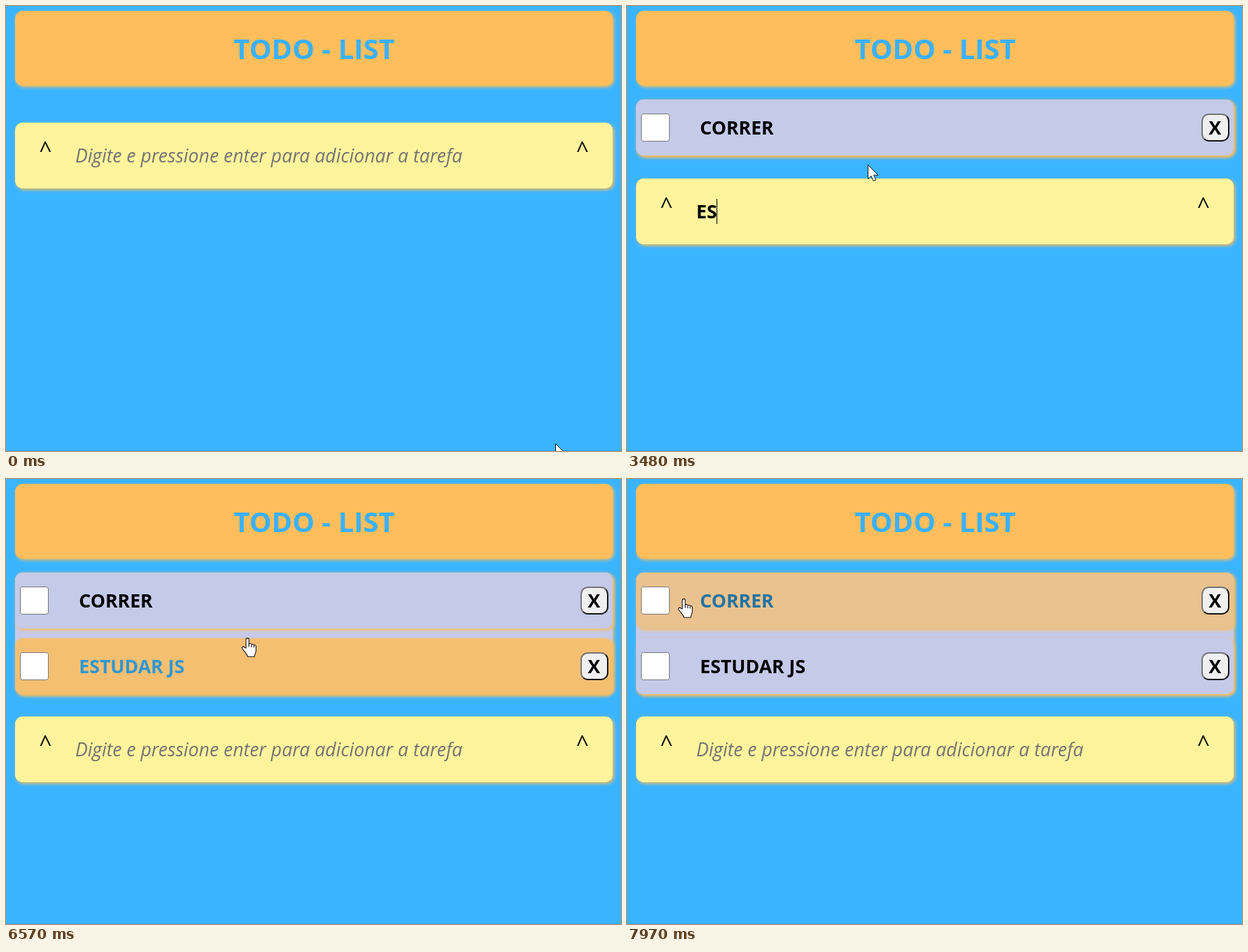
An HTML page for the animation above (8000 ms loop, 879x637 px).

```html
<!DOCTYPE html>
<html lang="pt">
<head>
<meta charset="utf-8">
<title>Todo list</title>
<style>
  html, body { margin: 0; width: 100%; height: 100%; overflow: hidden; background: #3ab4ff; }
  #stage {
    position: absolute; left: 0; top: 0; width: 879px; height: 637px; overflow: hidden;
    font: 26.67px "Open Sans", "Noto Sans", sans-serif; color: #000; white-space: pre;
  }
  #stage * { position: absolute; box-sizing: border-box; }
  .box { left: 13px; width: 854px; border-radius: 10.67px; box-shadow: 2px 2px 5.33px #ffbd59; }
  #title {
    top: 7px; height: 107px; line-height: 107px; background: #ffbe5b; color: #3ab1ff;
    font-size: 40px; font-weight: 700; text-align: center; text-indent: 1px;
  }
  #list { top: 134px; background: #c5cae9; }
  .item { left: 0; height: 80px; line-height: 80px; font-weight: 700; }
  .item b { left: 91.3px; }
  .check {
    left: 7px; top: 20px; width: 41px; height: 40px; background: #fff;
    border: 1.33px solid #767676; border-radius: 3.5px;
  }
  .close {
    left: 807.5px; top: 20px; width: 40px; height: 40px; line-height: 36px; text-align: center;
    background: #efefef; color: #000; border: 2.67px solid; border-radius: 10.67px;
    border-color: #767676 #151515 #151515 #767676;
  }
  #entry { height: 93.5px; line-height: 93.5px; background: #fff49c; }
  .mark { top: 15.5px; width: 40px; line-height: 45px; font-size: 32px; text-align: center; color: #111; }
  #line { left: 86px; top: 0; }
  #stage #line span { position: static; }
  #typed { font-weight: 700; }
  #hint { font-style: italic; color: #757575; }
  #caret { top: 28.5px; width: 1px; height: 36px; margin-left: -.45px; background: #000; }
  #edge { left: 0; top: 636px; width: 879px; height: 1px; background: #3a9fe2; }
  svg { left: 0; top: 0; }
</style>
</head>
<body>
<div id="stage">
  <div id="title" class="box">TODO - LIST</div>
  <div id="list" class="box"></div>
  <div id="entry" class="box">
    <div class="mark" style="left:23.3px">^</div>
    <div class="mark" style="left:791px">^</div>
    <div id="line"><span id="typed"></span><i id="caret"></i><span id="hint">Digite e pressione enter para adicionar a tarefa</span></div>
  </div>
  <div id="edge"></div>
  <svg width="879" height="637" stroke-linejoin="round">
    <g id="pointer">
      <path id="arrow" fill="#fff" stroke="#111" d="M.5.5V20.5L5 16.4 8.3 23.5 11.7 22 8.6 15.2H15z"/>
      <path id="beam" fill="none" stroke="#1a1a1a" stroke-width="1.6"
        d="M-3.5-10h4.5l1.5 1 1.5-1h4.5M2.5-9V11M-3.5 12h4.5l1.5-1 1.5 1h4.5"/>
      <g id="hand" fill="#fff" stroke="#111" stroke-width="1.1" transform="translate(-8 0)">
        <path d="M7 15V2.7a2.1 2.1 0 0 1 4.2 0V9.5a2 2 0 0 1 3.7.6 2 2 0 0 1 3.4 1 1.9 1.9 0 0 1 3 1.5V19c0 3-2.2 4.5-2.2 8.3H9.5C9 24 4.5 20 2 16.3c-1.7-2.4.8-4 2.7-2.5z"/>
        <path fill="none" d="M11.2 9.5v4M14.9 10.5v3.5M18.3 11.5v3"/>
      </g>
    </g>
  </svg>
</div>
<script>
const LOOP = 8000, FADE = 400, BLINK = 530;
const $ = id => document.getElementById(id);

const tasks = [
  { text: 'CORRER', keys: [1470, 1730, 2000, 2220, 2350, 2550], enter: 2950, hover: [[7265, 7550], [7825, 9000]] },
  { text: 'ESTUDAR JS', keys: [3280, 3480, 3680, 4010, 4270, 4400, 4680, 4950, 5550, 5880], enter: 6290, hover: [[6360, 7060]] }
];
const focusTime = 610;
const resets = [focusTime, ...tasks.flatMap(task => task.keys)];

// time, x, y of the pointer tip
const path = [
  [0, 785, 626], [70, 740, 590], [140, 612, 482], [210, 510, 405], [280, 436, 346],
  [350, 402, 315], [420, 370, 277], [490, 358, 252], [560, 348, 234], [630, 344, 227],
  [6570, 344, 227], [6780, 351, 278], [6850, 344, 274], [6990, 270, 235], [7060, 215, 222],
  [7130, 160, 217], [7200, 115, 215], [7270, 85, 198], [7340, 65, 188], [7410, 58, 184],
  [7550, 6, 190], [7620, 1, 190], [7760, 4, 188], [7830, 30, 180], [7900, 58, 174], [7970, 80, 171]
];
const shapes = [
  [0, 'arrow'], [490, 'beam'], [3080, 'arrow'], [6360, 'hand'], [7060, 'arrow'],
  [7270, 'hand'], [7340, 'arrow'], [7970, 'hand']
];

tasks.forEach((task, i) => {
  const el = document.createElement('div');
  el.className = 'box item';
  el.style.top = i * 93.5 + 'px';
  el.innerHTML = `<i class="check"></i><b>${task.text}</b><div class="close">X</div>`;
  $('list').append(el);
  task.el = el;
});

const lastBefore = (list, t) => list.filter(row => row[0] <= t).pop();
const mix = (a, b, k) => `rgb(${a.map((v, i) => v + (b[i] - v) * k).join(',')})`;

// the CSS "ease" curve: cubic-bezier(.25, .1, .25, 1)
function ease(x) {
  if (x <= 0) return 0;
  if (x >= 1) return 1;
  const bez = (a, b, s) => 3 * a * s * (1 - s) ** 2 + 3 * b * s * s * (1 - s) + s ** 3;
  let lo = 0, hi = 1;
  for (let i = 0; i < 20; i++) {
    const mid = (lo + hi) / 2;
    if (bez(.25, .25, mid) < x) lo = mid; else hi = mid;
  }
  return bez(.1, 1, lo);
}

function hoverLevel(spans, t) {
  return Math.max(...spans.map(([from, to]) =>
    ease((Math.min(t, to) - from) / FADE) * (1 - ease((t - to) / FADE))));
}

function drawPointer(t) {
  // the pointer is sampled every 70 ms
  const shift = t > 6000 ? 10 : 0;
  const s = Math.max(0, Math.floor((t + shift) / 70) * 70 - shift);
  const a = lastBefore(path, s);
  const b = path[path.indexOf(a) + 1] || a;
  const k = b === a ? 0 : (s - a[0]) / (b[0] - a[0]);
  const [x, y] = [1, 2].map(i => Math.round(a[i] + (b[i] - a[i]) * k));
  $('pointer').setAttribute('transform', `translate(${x} ${y})`);
  const shape = lastBefore(shapes, t)[1];
  for (const id of ['arrow', 'beam', 'hand']) $(id).style.display = id === shape ? '' : 'none';
}

function drawTasks(t) {
  let count = 0;
  for (const { el, enter, hover } of tasks) {
    const shown = t >= enter;
    el.style.display = shown ? '' : 'none';
    if (!shown) continue;
    count++;
    const k = hoverLevel(hover, t);
    el.style.background = mix([197, 202, 233], [255, 189, 89], k);
    el.style.color = mix([0, 0, 0], [56, 182, 255], k);
  }
  $('list').style.display = count ? '' : 'none';
  $('list').style.height = count * 93.5 - 13.5 + 'px';
  $('entry').style.top = [167, 247, 340.3][count] + 'px';
}

function drawEntry(t) {
  const task = tasks.find(item => t < item.enter);
  const typed = task ? task.text.slice(0, task.keys.filter(key => key <= t).length) : '';
  $('typed').textContent = typed;
  $('hint').style.display = typed ? 'none' : '';
  const since = t - resets.filter(time => time <= t).pop();
  const on = t >= focusTime && Math.floor(since / BLINK) % 2 === 0;
  $('caret').style.visibility = on ? 'visible' : 'hidden';
}

function frame() {
  const t = performance.now() % LOOP;
  drawTasks(t);
  drawEntry(t);
  drawPointer(t);
  requestAnimationFrame(frame);
}
frame();
</script>
</body>
</html>
```
